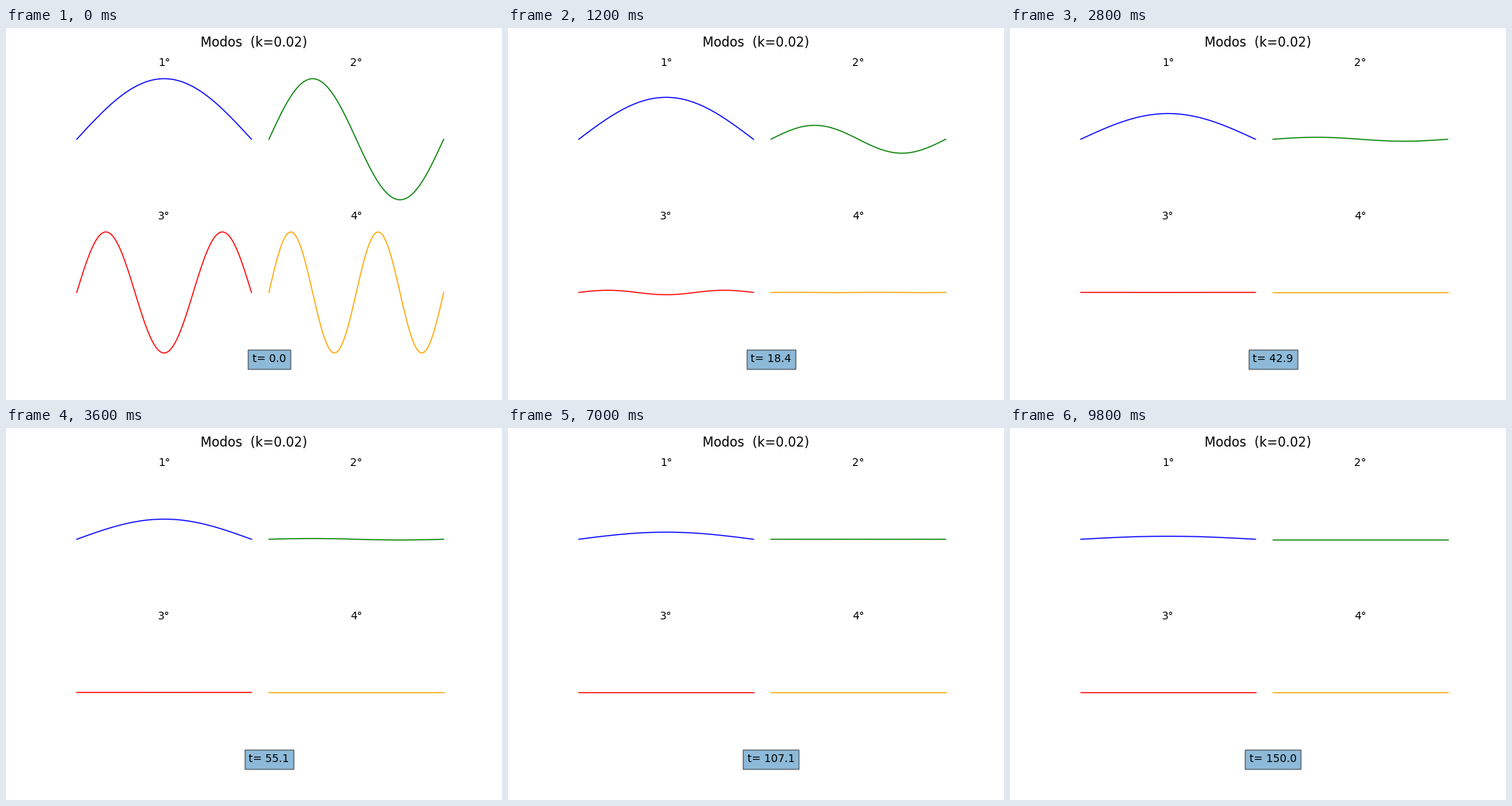
Recreate the animation shown at these times as a matplotlib script. Size 640 by 480 pixels, loop 10000 ms.

```python
import numpy as np
import matplotlib.pyplot as plt
from matplotlib.animation import FuncAnimation

K = 0.02
FRAMES = 50
COLORS = ["blue", "green", "red", "orange"]

plt.rcParams["font.family"] = "DejaVu Sans"

x = np.linspace(0, np.pi, 100)
times = np.linspace(0, 150, FRAMES)

fig, axes = plt.subplots(2, 2, figsize=(6.4, 4.8), dpi=100)
fig.subplots_adjust(left=0.125, right=0.9, bottom=0.11, top=0.88,
                    wspace=0, hspace=0.15)
fig.suptitle("Modos  (k=0.02)", fontsize=12)

lines = []
for n, (ax, color) in enumerate(zip(axes.flat, COLORS), start=1):
    line, = ax.plot(x, np.sin(n * x), color=color, lw=1)
    ax.set_xlim(-0.05 * np.pi, 1.05 * np.pi)
    ax.set_ylim(-1.1, 1.1)
    ax.set_title(f"{n}°", fontsize=10)
    ax.axis("off")
    lines.append(line)

clock = axes[1, 1].text(0, -1.15, "", ha="center", fontsize=10,
                        bbox=dict(facecolor="tab:blue", alpha=0.5))


def update(i):
    t = times[i]
    for n, line in enumerate(lines, start=1):
        line.set_ydata(np.exp(-K * n**2 * t) * np.sin(n * x))
    clock.set_text(f"t= {t:.1f}")
    return [*lines, clock]


anim = FuncAnimation(fig, update, frames=FRAMES, interval=200,
                     repeat=True, repeat_delay=0)
plt.show()
```
